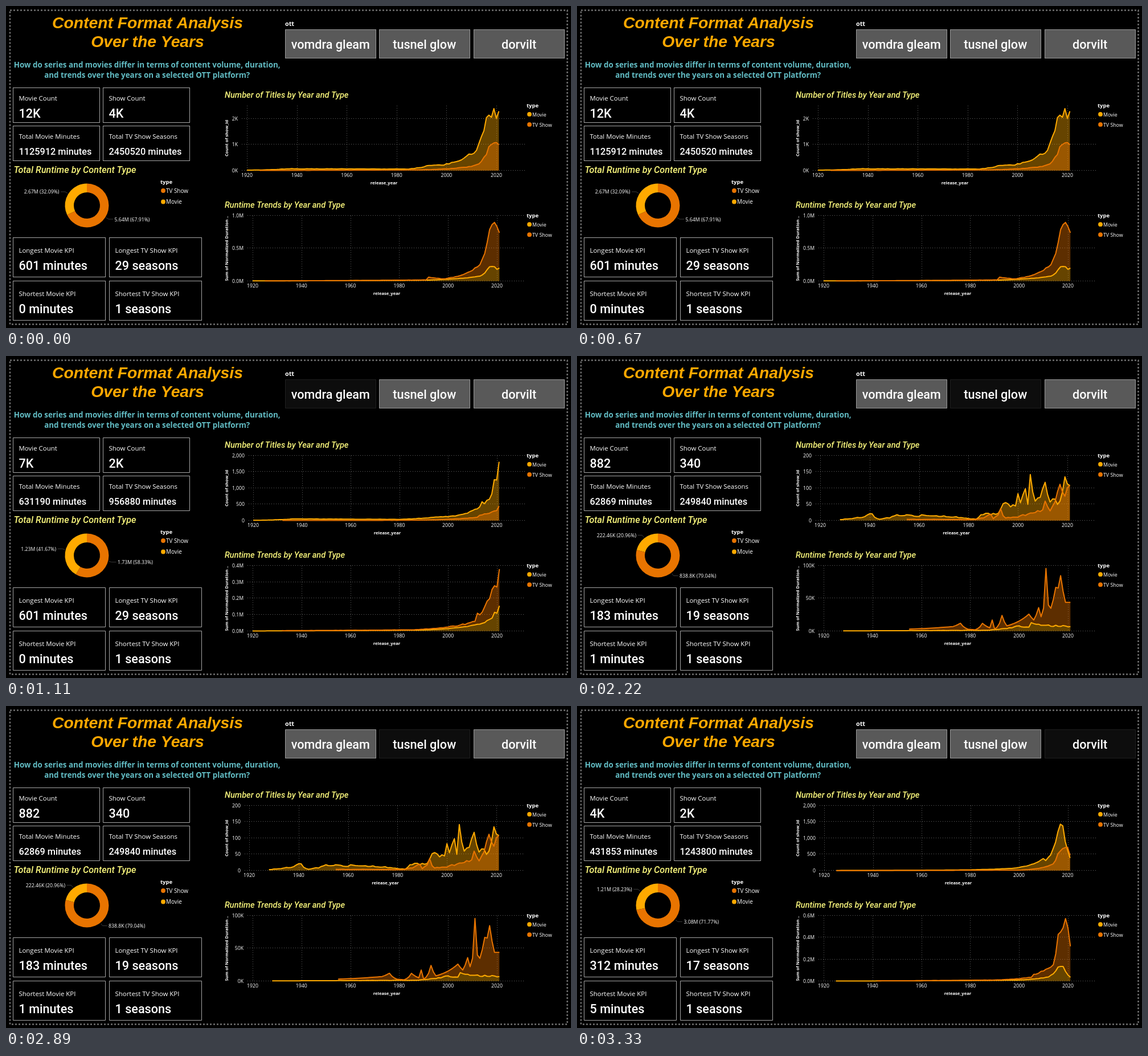
An HTML page with a canvas that plays this animation: 992 px wide and 565 px high, repeating every 4440 ms.

```html
<!DOCTYPE html>
<html lang="en">
<head>
<meta charset="utf-8">
<title>Content Format Analysis</title>
<style>
html, body { margin: 0; width: 100%; height: 100%; overflow: hidden; background: #000; }
canvas { display: block; width: 992px; height: 565px; }
</style>
</head>
<body>
<canvas id="stage"></canvas>
<script>
const W = 992, H = 565, HOLD = 1110;
const canvas = document.getElementById('stage');
const ctx = canvas.getContext('2d');
const ratio = window.devicePixelRatio || 1;
canvas.width = W * ratio;
canvas.height = H * ratio;
ctx.scale(ratio, ratio);

const MOVIE = '#ffaa00', SHOW = '#e87400', WHITE = '#fff', HEADING = '#f8f57c';
const SANS = '"Open Sans", "Noto Sans", sans-serif';
const DIN = 'Roboto, "Open Sans", sans-serif';
const ARIAL = '"Liberation Sans", Arial, sans-serif';
const LABEL = `500 11.45px ${SANS}`, SMALL = `500 8.7px ${SANS}`, AXIS = `bold 7.6px ${SANS}`;

// Exponential growth between key years, with seeded wobble in the years between.
function series(wobble, ...keys) {
  let seed = keys[0][0] * 7 + keys.length;
  const random = () => (seed = (seed * 16807) % 2147483647) / 2147483647;
  const points = [];
  keys.slice(1).forEach(([endYear, end], i) => {
    const [year, value] = keys[i];
    points.push([year, value]);
    for (let y = year + 1; y < endYear; y++) {
      const v = value * (end / value) ** ((y - year) / (endYear - year));
      points.push([y, v * (1 + wobble * (random() * 2 - 1))]);
    }
  });
  return [...points, keys[keys.length - 1]];
}

// Tick labels, value per tick, axis maximum, right edge of labels, x of 1920, pixels per year
const axis = (ticks, step, max, right = 417, x0 = 433, pitch = 4.29) =>
  ({ ticks: ticks.split(' '), step, max, right, x0, pitch });
const thousands = axis('0 500 1,000 1,500 2,000', 500, 2000, 419, 434, 4.275);

const states = [
  {
    share: .6791, show: '5.64M (67.91%)', movie: '2.67M (32.09%)',
    values: ['12K', '4K', '1125912 minutes', '2450520 minutes', '601 minutes', '29 seasons', '0 minutes', '1 seasons'],
    counts: {
      axis: axis('0K 1K 2K', 1, 2.514, 407, 423, 4.38),
      movie: series(.1, [1920, .015], [1936, .07], [1985, .06], [1993, .2], [1998, .21], [2012, .78],
        [2016, 2.05], [2019, 2.4], [2020, 2.02], [2021, 2.3]),
      show: series(.08, [1925, .006], [1990, .03], [2010, .16], [2013, .26], [2017, .93], [2020, 1.09], [2021, 1])
    },
    runtime: {
      axis: axis('0.0M 0.5M 1.0M', .5, 1),
      movie: series(.05, [1920, .003], [1990, .014], [2013, .075], [2017, .22], [2019, .22], [2020, .18], [2021, .2]),
      show: series(.06, [1925, .004], [1991, .018], [1992, .06], [1998, .035], [2013, .25], [2017, .79],
        [2019, .9], [2021, .74])
    }
  },
  {
    share: .5833, show: '1.73M (58.33%)', movie: '1.23M (41.67%)',
    values: ['7K', '2K', '631190 minutes', '956880 minutes', '601 minutes', '29 seasons', '0 minutes', '1 seasons'],
    counts: {
      axis: thousands,
      movie: series(.08, [1920, 8], [1936, 55], [1980, 38], [1995, 110], [2003, 140], [2013, 420], [2014, 580],
        [2015, 520], [2018, 820], [2019, 1260], [2020, 1250], [2021, 1810]),
      show: series(.08, [1932, 4], [1980, 8], [2012, 100], [2013, 165], [2020, 310], [2021, 450])
    },
    runtime: {
      axis: axis('0.0M 0.1M 0.2M 0.3M 0.4M', .1, .4),
      movie: series(.05, [1920, .001], [1990, .007], [2014, .048], [2018, .08], [2019, .115], [2020, .11], [2021, .155]),
      show: series(.08, [1932, .003], [1985, .008], [2000, .025], [2011, .06], [2012, .11], [2013, .1],
        [2015, .15], [2019, .278], [2020, .27], [2021, .38])
    }
  },
  {
    share: .7904, show: '838.8K (79.04%)', movie: '222.46K (20.96%)',
    values: ['882', '340', '62869 minutes', '249840 minutes', '183 minutes', '19 seasons', '1 minutes', '1 seasons'],
    counts: {
      axis: axis('0 50 100 150 200', 50, 200, 412, 427, 4.34),
      movie: series(.18, [1928, 3], [1941, 21], [1944, 4], [1951, 18], [1975, 12], [1983, 4], [1985, 18],
        [1992, 22], [1994, 52], [1999, 45], [2000, 83], [2001, 55], [2003, 98], [2004, 50], [2005, 142],
        [2007, 60], [2011, 118], [2013, 57], [2017, 60], [2019, 135], [2021, 108]),
      show: series(.18, [1955, 4], [1982, 3], [1989, 20], [1990, 6], [1993, 37], [1995, 8], [2010, 33],
        [2011, 60], [2013, 30], [2017, 112], [2019, 75], [2021, 108])
    },
    runtime: {
      axis: axis('0K 50K 100K', 50, 100),
      movie: series(.15, [1928, .4], [1985, 1.2], [2000, 8], [2004, 6], [2005, 13], [2011, 9], [2021, 7]),
      show: series(0, [1955, 3], [1973, 7], [1976, 12], [1979, 3], [1982, 2], [1985, 12], [1988, 5], [1989, 17],
        [1990, 3], [1993, 24], [1995, 8], [2004, 26], [2006, 17], [2008, 36], [2009, 22], [2010, 35],
        [2011, 96], [2012, 40], [2013, 35], [2015, 67], [2016, 66], [2017, 85], [2019, 44], [2021, 44])
    }
  },
  {
    share: .7177, show: '3.08M (71.77%)', movie: '1.21M (28.23%)',
    values: ['4K', '2K', '431853 minutes', '1243800 minutes', '312 minutes', '17 seasons', '5 minutes', '1 seasons'],
    counts: {
      axis: thousands,
      movie: series(.05, [1925, 3], [1980, 25], [1998, 75], [2010, 370], [2011, 310], [2013, 480], [2016, 1200],
        [2017, 1430], [2018, 1380], [2021, 390]),
      show: series(.05, [1925, 2], [2000, 15], [2014, 205], [2016, 520], [2018, 680], [2020, 710], [2021, 470])
    },
    runtime: {
      axis: axis('0.0M 0.2M 0.4M 0.6M', .2, .6),
      movie: series(.05, [1925, .001], [2000, .01], [2012, .038], [2016, .13], [2018, .135], [2021, .035]),
      show: series(.08, [1942, .003], [1990, .01], [2005, .034], [2006, .062], [2014, .15], [2016, .43],
        [2019, .575], [2020, .49], [2021, .32])
    }
  }
];

const rows = [
  { y: 144, w: 152, h: 61, step: 158, size: 21.6, labels: ['Movie Count', 'Show Count'] },
  { y: 211, w: 152, h: 61, step: 158, size: 16.3, labels: ['Total Movie Minutes', 'Total TV Show Seasons'] },
  { y: 407, w: 162, h: 69, step: 169, size: 21.6, labels: ['Longest Movie KPI', 'Longest TV Show KPI'] },
  { y: 483, w: 162, h: 69, step: 169, size: 21.6, labels: ['Shortest Movie KPI', 'Shortest TV Show KPI'] }
];
const platforms = ['vomdra gleam', 'tusnel glow', 'dorvilt'];

function text(str, x, y, font, color = WHITE, align = 'left') {
  ctx.font = font;
  ctx.fillStyle = color;
  ctx.textAlign = align;
  ctx.fillText(str, x, y);
}

function line(points, color, width, dash = []) {
  ctx.beginPath();
  points.forEach(([x, y]) => ctx.lineTo(x, y));
  ctx.strokeStyle = color;
  ctx.lineWidth = width;
  ctx.setLineDash(dash);
  ctx.stroke();
  ctx.setLineDash([]);
}

function box(x, y, w, h, color) {
  ctx.strokeStyle = color;
  ctx.lineWidth = 1;
  ctx.strokeRect(x, y, w, h);
}

function area(top, bottom, color) {
  ctx.beginPath();
  [...top, ...bottom].forEach(([x, y]) => ctx.lineTo(x, y));
  ctx.globalAlpha = .4;
  ctx.fillStyle = color;
  ctx.fill();
  ctx.globalAlpha = 1;
}

function legend(x, y, items, gap, size) {
  text('type', x, y, `bold 9.5px ${SANS}`);
  items.forEach(([name, color], i) => {
    const cy = y + 12 + i * gap;
    ctx.beginPath();
    ctx.arc(x + 5, cy, 3.9, 0, Math.PI * 2);
    ctx.fillStyle = color;
    ctx.fill();
    text(name, x + 10, cy + 3.6, `500 ${size}px ${SANS}`);
  });
}

function chart(data, y0, height, title, caption, stacked) {
  const { ticks, step, max, right, x0, pitch } = data.axis;
  const top = y0 - height;
  const px = year => x0 + (year - 1920) * pitch;
  const py = v => y0 - v / max * height;
  text(title, 384, top - 13.8, `italic 500 14.55px ${DIN}`, HEADING);

  ticks.forEach((tick, i) => {
    const y = Math.round(py(i * step)) - .5;
    line([[right + 7, y], [911, y]], '#666', 1, [1, 3]);
    text(tick, right, y + 3.2, SMALL, WHITE, 'right');
  });
  for (let year = 1920; year <= 2020; year += 20) {
    const x = Math.round(px(year)) + .5;
    line([[x, top], [x, y0]], '#666', 1, [1, 3]);
    text(year, px(year), y0 + 11.5, SMALL, WHITE, 'center');
  }

  const plot = list => list.map(([year, v]) => [px(year), py(v)]);
  const floor = list => [[list[list.length - 1][0], y0], [list[0][0], y0]];
  const movie = plot(data.movie), show = plot(data.show);
  const under = movie.filter(([x]) => x >= show[0][0]).reverse();
  area(movie, floor(movie), MOVIE);
  area(show, stacked ? under : floor(show), SHOW);
  ctx.lineJoin = 'round';
  line(movie, MOVIE, 2);
  line(show, SHOW, 2);

  text('release_year', (right + 920) / 2, y0 + 24, AXIS, WHITE, 'center');
  ctx.save();
  ctx.translate(390, y0 - height / 2);
  ctx.rotate(-Math.PI / 2);
  text(caption, 0, 0, AXIS, WHITE, 'center');
  ctx.restore();
  legend(914, top + 3, [['Movie', MOVIE], ['TV Show', SHOW]], 18, 8.8);
}

function donut({ share, show, movie }) {
  const cx = 142, cy = 350, turn = Math.PI * 2;
  const slice = (from, to, color, label) => {
    const a = (from - .25) * turn, b = (to - .25) * turn;
    ctx.beginPath();
    ctx.arc(cx, cy, 38.5, a, b);
    ctx.arc(cx, cy, 23, b, a, true);
    ctx.fillStyle = color;
    ctx.fill();
    const mid = (a + b) / 2, side = Math.sign(Math.cos(mid));
    const at = r => [cx + r * Math.cos(mid), cy + r * Math.sin(mid)];
    const [x, y] = at(45);
    line([at(40), [x, y], [x + side * 8, y]], '#3a3a3a', 1);
    text(label, x + side * 10.5, y + 3.5, SMALL, WHITE, side > 0 ? 'left' : 'right');
  };
  slice(0, share, SHOW, show);
  slice(share, 1, MOVIE, movie);
}

function header(index) {
  const title = `italic bold 28.3px ${ARIAL}`, question = `bold 13.4px ${SANS}`, teal = '#62bcc4';
  text('Content Format Analysis', 248.5, 39, title, '#ffa800', 'center');
  text('Over the Years', 248.5, 71.5, title, '#ffa800', 'center');
  text('How do series and movies differ in terms of content volume, duration,', 247.7, 107.5, question, teal, 'center');
  text('and trends over the years on a selected OTT platform?', 247.7, 126, question, teal, 'center');

  text('ott', 490, 34.5, `bold 10.8px ${SANS}`);
  platforms.forEach((name, i) => {
    const x = Math.round(490 + i * 165.4), active = i === index - 1;
    ctx.fillStyle = active ? '#0d0d0d' : '#595959';
    ctx.fillRect(x, 41, 160, 51);
    box(x + .5, 41.5, 159, 50, active ? '#1f1f1f' : '#999');
    text(name, x + 79.7, 75, `500 21.6px ${DIN}`, WHITE, 'center');
  });
}

function draw(index) {
  const state = states[index];
  ctx.fillStyle = '#000';
  ctx.fillRect(0, 0, W, H);
  line([[7, 7.5], [985.5, 7.5], [985.5, 558.5], [7, 558.5], [7, 7.5]], '#707070', 2.5, [3, 3]);
  header(index);

  rows.forEach(({ y, w, h, step, size, labels }, row) => labels.forEach((label, col) => {
    const x = 13 + col * step, mid = y + h / 2;
    box(x - .5, y - .5, w, h, '#a6a6a6');
    text(label, x + 9.5, mid - 8.5, LABEL);
    text(state.values[row * 2 + col], x + 9.5, mid + 13.5 + size * .35, `500 ${size}px ${DIN}`);
  }));

  text('Total Runtime by Content Type', 13.5, 293, `italic 500 16.2px ${DIN}`, HEADING);
  donut(state);
  legend(271, 312, [['TV Show', SHOW], ['Movie', MOVIE]], 19.5, 9.9);
  chart(state.counts, 288.8, 113.9, 'Number of Titles by Year and Type', 'Count of show_id', false);
  chart(state.runtime, 482.7, 114.5, 'Runtime Trends by Year and Type', 'Sum of Normalized Duration ..', true);
}

const start = performance.now();
let shown = -1;
function tick() {
  const index = Math.floor((performance.now() - start) / HOLD) % states.length;
  if (index !== shown) draw(shown = index);
  requestAnimationFrame(tick);
}
tick();
</script>
</body>
</html>
```
